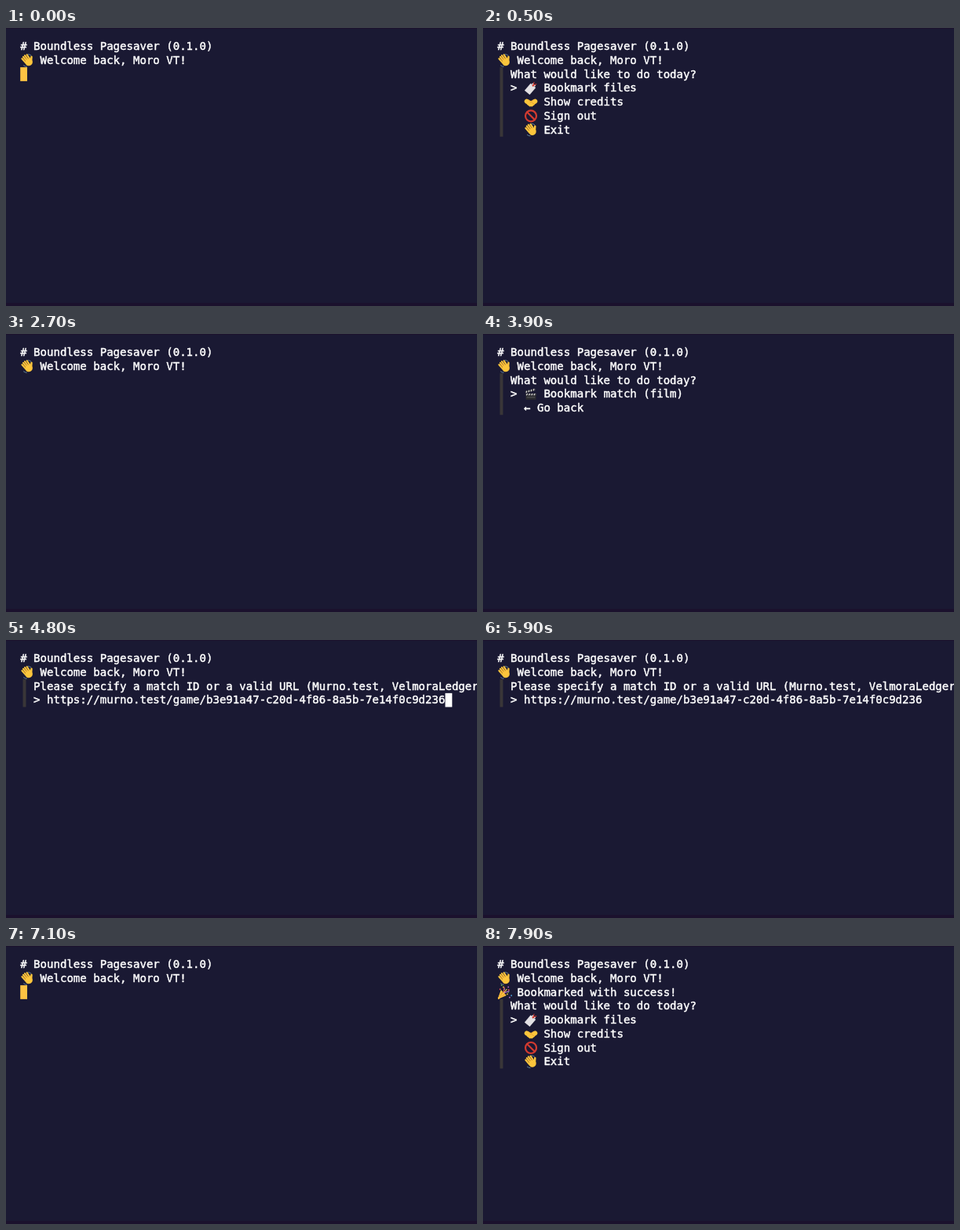
Animation of 600x355 px, one loop 8 s. Source, as an HTML page with a canvas:

```html
<!DOCTYPE html>
<html lang="en">
<head>
<meta charset="utf-8">
<title>Terminal session</title>
<style>
html, body { margin: 0; width: 100%; height: 100%; overflow: hidden; background: #1a1933; }
canvas { display: block; width: 600px; height: 355px; }
</style>
</head>
<body>
<canvas id="stage" width="600" height="355"></canvas>
<script>
const ctx = document.getElementById('stage').getContext('2d');
const LOOP = 8000, TURN = Math.PI * 2;
const SIZE = 14.05, COL = SIZE * 0.602, ROW = 17.72, LEFT = 18.2, TOP = 14.7;
const BG = '#1a1933', EDGE = '#1b112d', BAR = '#393638', WHITE = '#ffffff', AMBER = '#fdc343';
const SKIN = '#fcc53c', SHADE = '#d98b25', RED = '#d33b30', PAPER = '#e2e0e3', SLATE = '#414145';
const CONFETTI = ['#e8525d', '#67b35b', '#f6cd46', '#4d9fdb', '#b66bd1'];

const x = col => LEFT + col * COL;
const y = row => TOP + row * ROW;

function rect(color, left, top, w, h) {
  ctx.fillStyle = color;
  ctx.fillRect(left, top, w, h);
}

// A thin outline gives the glyphs their heavier smoothing.
function text(str, col, row) {
  const base = Math.round(y(row) + 13.6);
  ctx.fillStyle = ctx.strokeStyle = WHITE;
  ctx.lineWidth = 0.45;
  ctx.fillText(str, x(col), base);
  ctx.strokeText(str, x(col), base);
}

function line(color, width, x1, y1, x2, y2) {
  ctx.strokeStyle = color;
  ctx.lineWidth = width;
  ctx.beginPath();
  ctx.moveTo(x1, y1);
  ctx.lineTo(x2, y2);
  ctx.stroke();
}

function dot(color, cx, cy, rx, ry = rx) {
  ctx.fillStyle = color;
  ctx.beginPath();
  ctx.ellipse(cx, cy, rx, ry, 0, 0, TURN);
  ctx.fill();
}

function arc(color, width, r, from, to) {
  ctx.strokeStyle = color;
  ctx.lineWidth = width;
  ctx.beginPath();
  ctx.arc(0, 0, r, from, to);
  ctx.stroke();
}

// Icons are centred on the origin, about 16 px across.
const icons = {
  wave() {
    ctx.rotate(-0.65);
    for (let i = 0; i < 4; i++) {
      const fx = (i - 1.5) * 2.3;
      line(SKIN, 2.2, fx, 2, fx * 1.15, Math.abs(i - 1.6) - 7.4);
      if (i) line(SHADE, 0.5, fx - 1.2, -1, fx - 1.3, -5);
    }
    line(SKIN, 2.5, 3, 4, 7, -0.5);
    dot(SKIN, 0.2, 3.2, 4.7, 4.4);
    for (const side of [0, Math.PI]) arc('#6e90a6', 0.8, 8, side - 0.8, side - 0.3);
  },
  tag() {
    ctx.rotate(0.7);
    rect(PAPER, -4.3, -4.5, 8.6, 12);
    rect(PAPER, -2.6, -6.5, 5.2, 2);
    dot(RED, 0, -4.3, 1.2);
    for (const side of [-1, 1]) line(RED, 1.1, 0, -4.3, side * 1.8, -8.3);
  },
  shake() {
    for (const side of [-1, 1]) {
      line(SKIN, 6, side * 5.3, -1, side, 1.5);
      line(SKIN, 2.2, side * 4, 2.5, side, 4.8);
      line(SHADE, 0.6, side * 2.6, -2.5, -side, 1);
    }
    line(SHADE, 0.6, 1, 0.5, 4.2, 2.8);
  },
  ban() {
    arc(RED, 2.2, 7, 0, TURN);
    line(RED, 2.2, -4.8, -4.8, 4.8, 4.8);
  },
  film() {
    rect('#2b2b2f', -6.5, -1, 13, 8);
    for (const tilt of [0, -0.28]) {
      ctx.save();
      ctx.translate(-6.5, -1);
      ctx.rotate(tilt);
      const top = tilt ? -3 : 0;
      rect(SLATE, 0, top, 13, 2.6);
      for (let i = 0; i < 4; i++) line(PAPER, 1.1, i * 3.2 + 1, top + 2, i * 3.2 + 1.8, top + 0.6);
      ctx.restore();
    }
    line('#77777c', 0.6, -5, 4, 5, 4);
  },
  party() {
    for (let i = 0; i < 10; i++) {
      const a = -1.75 + i * 0.22, r = 8 + (i * 5 % 7);
      dot(CONFETTI[i % 5], r * Math.cos(a) - 4, r * Math.sin(a) + 4, 0.9);
    }
    for (let i = 0; i < 3; i++) line(CONFETTI[i * 2], 1.1, -1, 1, i * 3, i * 2.2 - 6);
    for (let i = 0; i < 9; i++) {
      line(i % 4 === 3 ? SHADE : AMBER, 1.5, -7.3, 7.5, i * 0.7 - 4, i * 0.7 - 2);
    }
  }
};

function icon(name, col, row) {
  ctx.save();
  ctx.translate(x(col) + 9, y(row) + 9);
  icons[name]();
  ctx.restore();
}

const bar = (row, count) => rect(BAR, 21.5, y(row), 4, count * ROW);
const block = (col, row, color) => rect(color, x(col), y(row), 8.8, ROW);

const MAIN = [['tag', 'Bookmark files'], ['shake', 'Show credits'],
  ['ban', 'Sign out'], ['wave', 'Exit']];
const FILES = [['film', 'Bookmark match (film)'], ['', '← Go back']];
const LINK = 'https://murno.test/game/b3e91a47-c20d-4f86-8a5b-7e14f0c9d236';

function menu(items, picked, row = 2) {
  bar(row, items.length + 1);
  text('What would like to do today?', 2, row);
  items.forEach(([name, label], i) => {
    const r = row + 1 + i;
    if (i === picked) text('>', 2, r);
    if (name) icon(name, 4, r);
    text(label, name ? 7 : 4, r);
  });
}

// The selection walks down to the last entry and back up at an even pace.
function mainMenu(t) {
  menu(MAIN, Math.max(0, 3 - Math.round(Math.abs(t - 1790) / 140)));
}

function filesMenu(t) {
  menu(FILES, t >= 3300 && t < 3900 ? 1 : 0);
}

function prompt(t) {
  const value = t < 4800 ? '' : LINK;
  bar(2, 2);
  text('Please specify a match ID or a valid URL (Murno.test, VelmoraLedger.test)', 2, 2);
  text('> ' + value, 2, 3);
  if (t < 5300) block(4 + value.length, 3, WHITE);
}

function success() {
  icon('party', 0, 2);
  text('Bookmarked with success!', 3, 2);
  menu(MAIN, 0, 3);
}

const idle = () => block(0, 2, AMBER);
const blank = () => {};

// Each scene holds until the next one starts.
const scenes = [
  [0, idle], [100, mainMenu], [2700, blank], [2800, filesMenu],
  [4200, blank], [4300, prompt], [6000, idle], [7600, success]
];

function draw(t) {
  rect(EDGE, 0, 0, 600, 355);
  rect(BG, 0, 1, 600, 350);
  text('# Boundless Pagesaver (0.1.0)', 0, 0);
  icon('wave', 0, 1);
  text('Welcome back, Moro VT!', 3, 1);
  scenes.findLast(([start]) => start <= t)[1](t);
}

ctx.font = `${SIZE}px "DejaVu Sans Mono", monospace`;
ctx.lineCap = ctx.lineJoin = 'round';

const begin = performance.now();
function tick() {
  draw((performance.now() - begin) % LOOP);
  requestAnimationFrame(tick);
}
tick();
</script>
</body>
</html>
```
